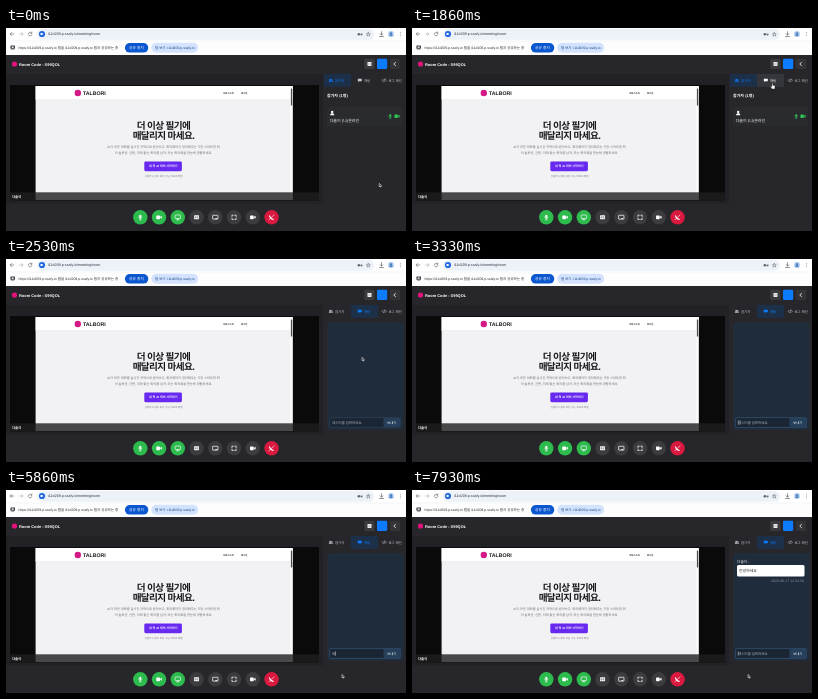
Animation of 400 by 203 pixels, one loop 8 s. Source, as an HTML page:

```html
<!DOCTYPE html>
<html lang="ko">
<head>
<meta charset="utf-8">
<title>Meeting room</title>
<style>
  html, body { margin: 0; width: 100%; height: 100%; overflow: hidden; background: #27272b; }
  svg { display: block; width: 100%; height: 100%; }
  text { font-family: "Liberation Sans", "Noto Sans CJK KR", "Noto Sans CJK", sans-serif; text-rendering: geometricPrecision; white-space: pre; }
</style>
</head>
<body>
<svg id="stage" viewBox="0 0 400 203" preserveAspectRatio="none"></svg>
<script>
const LOOP = 8000;
const HOST = 'i11d209.p.ssafy.io';
const USER = '다솔이';
const BLUE = '#0d7bfd', PANEL = '#27272b';

const rect = (x, y, w, h, fill, r = 0, extra = '') =>
  `<rect x="${x}" y="${y}" width="${w}" height="${h}" rx="${r}" fill="${fill}" ${extra}/>`;
const disc = (x, y, r, fill) => `<circle cx="${x}" cy="${y}" r="${r}" fill="${fill}"/>`;
const label = (x, y, size, fill, str, extra = '') =>
  `<text x="${x}" y="${y}" font-size="${size}" fill="${fill}" ${extra}>${str}</text>`;
const line = (d, color, w = 0.7) =>
  `<path d="${d}" fill="none" stroke="${color}" stroke-width="${w}" stroke-linecap="round" stroke-linejoin="round"/>`;
const solid = (d, fill) => `<path d="${d}" fill="${fill}"/>`;
const at = (x, y, body, scale = 1) => `<g transform="translate(${x} ${y}) scale(${scale})">${body}</g>`;
const group = (id, body) => `<g id="${id}">${body}</g>`;
const MID = 'text-anchor="middle"';
const BOLD = 'font-weight="700"';

// Icons are drawn around their own centre.
const icon = {
  mic: c => rect(-1, -2.9, 2, 3.7, c, 1) + line('M-1.8-.4A1.8 1.9 0 0 0 1.8-.4M0 1.5V2.7M-.9 2.7H.9', c, 0.6),
  camera: c => rect(-3, -2, 4, 4, c, 0.7) + solid('M1.3-.6 3-1.7V1.7L1.3.6Z', c),
  screen: c => rect(-2.9, -2.5, 5.8, 3.9, 'none', 0.5, `stroke="${c}" stroke-width=".7"`) + line('M0 1.5V2.6M-1.3 2.7H1.3', c),
  caption: c => rect(-2.7, -2.1, 5.4, 4.2, c, 0.5) + line('M-.6-.6H-1.6V.7H-.6M1.6-.6H.6V.7H1.6', '#3b3b40', 0.5),
  board: c => rect(-2.9, -2.2, 5.8, 4.2, 'none', 0.3, `stroke="${c}" stroke-width=".8"`) + rect(0, 0.9, 1.9, 0.9, c),
  expand: c => line('M-2.3-.9V-2.3H-.9M.9-2.3H2.3V-.9M2.3.9V2.3H.9M-.9 2.3H-2.3V.9', c, 0.85),
  hangup: c => line('M-2.2-1.6C-1.7.6-.4 1.9 1.8 2.3', c, 1.2) + line('M-2.7 2.7 2.7-2.7', c, 0.7),
  person: c => disc(0, -1.2, 1.2, c) + solid('M-2.1 2.1C-2.1-.5 2.1-.5 2.1 2.1Z', c),
  people: c => disc(-0.7, -0.9, 0.9, c) + disc(1, -0.8, 0.7, c) + solid('M-2.2 1.5C-2.2-.4.8-.4.8 1.5ZM1.1 1.5C1.1.7.9.4.7.1 1.7-.1 2.4.4 2.4 1.5Z', c),
  bubble: c => solid('M-2.2-1.7H2.2V1.1H-.4L-1.4 2V1.1H-2.2Z', c),
  code: c => line('M-1.2-1.2-2.4 0-1.2 1.2M1.2-1.2 2.4 0 1.2 1.2M.5-1.6-.5 1.6', c, 0.6),
  star: c => line('M0-2 .6-.6 2-.5.9.4 1.3 1.8 0 1-1.3 1.8-.9.4-2-.5-.6-.6Z', c, 0.5)
};

function browser() {
  const ink = '#5d6268';
  return rect(0, 0, 400, 13, '#fff') + rect(31, 0.8, 337, 11, '#edf1f8', 5.5) +
    line('M7.8 6H4.2M5.8 4.4 4.2 6 5.8 7.6', ink, 0.6) + line('M13.4 6H17M15.4 4.4 17 6 15.4 7.6', '#a9adb2', 0.6) +
    line('M25.6 5A1.8 1.8 0 1 0 25.9 6.6M25.9 4V5.2H24.7', ink, 0.6) +
    disc(36, 6, 3.1, '#2268df') + rect(34.5, 4.9, 2.2, 2.1, '#fff', 0.4) +
    label(42, 7.4, 3.67, '#30343a', HOST + '/meeting/room') +
    disc(352.8, 6.2, 1.2, ink) + line('M354 6.2H356.4M355.6 6.2V7.2', ink, 0.8) + at(362.3, 6.3, icon.star(ink)) +
    line('M375.5 3.7V7M374.2 5.8 375.5 7.1 376.8 5.8M373.6 8.5H377.4', ink) +
    disc(385, 6, 2.9, '#a9c8f2') + at(385, 6.1, icon.person('#3b6fae'), 0.8) +
    disc(394.3, 4.3, 0.45, ink) + disc(394.3, 6, 0.45, ink) + disc(394.3, 7.7, 0.45, ink) +
    rect(0, 13, 400, 14, '#fdfdfe') + rect(0, 12.8, 400, 0.4, '#dfe3e8') +
    rect(4.4, 17.6, 4.6, 3.2, '#3c4147', 0.4) + rect(5.7, 18.5, 2, 1.3, '#fff') + line('M5.6 21.4H7.8', '#3c4147', 0.5) +
    label(12.5, 20.9, 3.5, '#303338', `https://${HOST} 탭을 ${HOST} 탭과 공유하는 중`) +
    rect(118.9, 15, 23.4, 9.6, '#0b57d0', 4.8) + label(130.5, 21, 3.75, '#fff', '공유 중지', MID) +
    rect(145.3, 14.8, 46.8, 10, '#d3e3fd', 5) + label(168.8, 20.9, 3.45, '#17468a', `탭 보기: ${HOST}`, MID);
}

function header() {
  return rect(0, 27, 400, 19, PANEL) + disc(8.5, 36, 2.6, '#e5127d') +
    label(13, 37.5, 3.95, '#fff', 'Room Code : S99QOL', BOLD) +
    rect(358.3, 30.8, 10.2, 10.2, '#3a3a3f', 1.2) + rect(361.5, 34, 4, 4, '#f1f3f5', 0.4) +
    line('M362 35.3H365M362 36.7H365', '#747b82', 0.35) +
    rect(371, 30.8, 10.2, 10.2, BLUE, 1.2) +
    rect(383.8, 30.8, 10.2, 10.2, '#343438', 1.2) + line('M389.4 34.4 387.8 36 389.4 37.6', '#fff', 0.8);
}

function sharedPage() {
  const gray = '#666a70', left = 29.6, width = 257, mid = 157.5;
  return rect(left, 58, width, 114, '#f2f2f4') + rect(left, 58, width, 13.5, '#fff') + rect(left, 71.3, width, 0.4, '#e2e2e5') +
    disc(71.8, 65, 3.2, '#d41888') + label(77, 66.9, 5.2, '#17171c', 'TALBORI', BOLD) +
    label(217, 66, 2.3, '#222', '서비스소개', BOLD) + label(235, 66, 2.3, '#222', '로그인', BOLD) +
    label(mid, 101, 9.6, '#18181b', '더 이상 필기에', `${MID} ${BOLD} letter-spacing="-.6"`) +
    label(mid, 111.4, 9.6, '#18181b', '매달리지 마세요.', `${MID} ${BOLD} letter-spacing="-.6"`) +
    label(mid, 120.3, 3.2, gray, 'AI가 모든 대화를 실시간 자막으로 받아쓰고, 회의록까지 정리해주는 가장 스마트한 회', MID) +
    label(mid, 125.6, 3.2, gray, '의 솔루션, 간편, 미래 없는 회의를 남겨, 또는 회의록을 한눈에 경험하세요.', MID) +
    rect(138.3, 133.4, 37.6, 9.8, '#6728f0', 1.4) + label(157.2, 139.3, 3, '#fff', '내 첫 AI 회의 시작하기', `${MID} ${BOLD}`) +
    label(mid, 148.8, 2.5, '#777a80', '신용카드 없이 모든 기능 무료로 체험', MID) +
    rect(284.2, 58, 2.4, 114, '#fafafa') + rect(284.9, 60.5, 1.3, 17, '#4c4c50', 0.6);
}

function video() {
  return rect(0, 46, 317, 130, '#222125') + rect(4, 57, 309, 115.5, '#0a0a0b') + sharedPage() +
    rect(4, 164.3, 309, 8.2, '#1e1e20', 0, 'opacity=".8"') + label(6, 169.5, 3.4, '#fff', USER, BOLD);
}

function controls() {
  const green = '#2dbb4e', gray = '#3b3b40';
  const items = [
    ['mic', green], ['camera', green], ['screen', green], ['caption', gray],
    ['board', gray], ['expand', gray], ['camera', gray], ['hangup', '#d9193f']
  ];
  return rect(0, 175.5, 400, 27.5, PANEL) + items.map(([name, fill], i) =>
    at(134.3 + i * 18.75, 189.3, disc(0, 0, 7.2, fill) + at(0, 0, icon[name]('#fff'), 0.92))).join('');
}

const tabItems = [['people', '참가자', 318, 329], ['bubble', '채팅', 345, 358], ['code', '로그 확인', 372, 382.5]];

function tab(i, color, fill) {
  const [name, str, x, tx] = tabItems[i];
  return rect(x, 46, 27, 12.8, fill) +
    at(tx - 4.2, 52.3, icon[name](color), 0.9) + label(tx, 53.6, 3.4, color, str);
}

const tabs = active => tabItems.map((_, i) =>
  i === active ? tab(i, BLUE, '#1d304a') : tab(i, '#c3c8cd', PANEL)).join('');

function membersPanel() {
  return tabs(0) + group('hover', tab(1, '#fff', '#35363b')) +
    label(321, 69.2, 4, '#fff', '참가자 (1명)', BOLD) +
    rect(321, 79, 75.5, 19, '#2a2b2f', 1.5) + at(326.2, 85.2, icon.person('#fff')) +
    label(323.7, 93.5, 4, '#fff', `${USER} (나)온라인`) +
    at(384.2, 88.2, icon.mic('#2fc653'), 0.8) + at(391, 88.2, icon.camera('#2fc653'), 0.85);
}

function chatPanel() {
  const message = label(325, 73.2, 3.7, '#fff', `${USER} :`) +
    rect(325, 75, 67.5, 11.5, '#fff', 1.5) + label(327, 82.2, 3.9, '#1d2023', '안녕하세요') +
    label(392, 92, 3.55, '#8793a0', '2026-08-17 12:32:50', 'text-anchor="end"');
  return tabs(1) +
    rect(322, 64, 75, 106, '#1e2c3c', 1.5, 'stroke="#27394d" stroke-width=".4"') +
    group('message', message) +
    `<rect id="field" x="323.6" y="158.6" width="71" height="9.8" rx="1.2" fill="#1b2634" stroke-width=".45"/>` +
    rect(377.5, 159, 16.7, 9, '#26405b', 1.1) + label(385.7, 164.9, 3.3, '#fff', '보내기', MID) +
    `<text id="typed" x="326.3" y="165" font-size="3.4"></text>` +
    `<rect id="caret" y="161.4" width=".4" height="4.4" fill="#fff"/>`;
}

function pointers() {
  return group('arrow', at(0, 0, '<path d="M0 0V4.8L1.2 3.8 2 5.5 2.8 5.1 2.1 3.5 3.6 3.4Z" fill="#111" stroke="#fff" stroke-width=".8" stroke-linejoin="round"/>', 0.68)) +
    group('hand', '<path d="M-.6-1V2.2L-1.6 1.4-2.1 2-.5 4.5H2.2L2.6 1.6 1.8 1.1.4.9V-1Q-.1-1.6-.6-1Z" fill="#fff" stroke="#111" stroke-width=".35"/>') +
    group('beam', line('M-.5-1.8H.5M0-1.8V1.8M-.5 1.8H.5', '#9aa4ae', 0.3));
}

const stage = document.getElementById('stage');
stage.innerHTML = browser() + header() + video() + rect(317, 46, 83, 130, PANEL) + controls() +
  group('members', membersPanel()) + group('chat', chatPanel()) + pointers();
const el = {};
stage.querySelectorAll('[id]').forEach(node => { el[node.id] = node; });

const OPEN_CHAT = 2000, FOCUS = 3200, SEND = 7730;
const path = [
  [0, 373.2, 155.4], [60, 373.2, 155.4], [860, 360.5, 56.5], [2070, 360.5, 56.5], [2500, 356, 98.4],
  [2730, 356, 98.4], [3200, 328, 163.5], [3600, 328, 163.5], [3930, 336, 184.5], [LOOP, 336, 184.5]
];
const typing = [
  [FOCUS, ''], [4130, 'd'], [4400, 'dk'], [4700, 'dks'], [5060, 'dkss'], [5200, 'dk'], [5330, 'd'], [5460, ''],
  [5730, 'ㅇ'], [5860, '아'], [6060, '안'], [6260, '안ㄴ'], [6360, '안녀'], [6460, '안녕'], [6600, '안녕ㅎ'],
  [6860, '안녕하'], [7000, '안녕하ㅅ'], [7130, '안녕하세'], [7260, '안녕하세ㅇ'], [7400, '안녕하세요'], [SEND, '']
];

const show = (node, on) => node.setAttribute('visibility', on ? 'inherit' : 'hidden');
const ease = p => p * p * (3 - 2 * p);

function pointerAt(t) {
  const i = path.findIndex((p, k) => k > 0 && t <= p[0]);
  const [t0, x0, y0] = path[i - 1], [t1, x1, y1] = path[i];
  const p = ease((t - t0) / (t1 - t0));
  return [x0 + (x1 - x0) * p, y0 + (y1 - y0) * p];
}

function drawPointer(t) {
  const [x, y] = pointerAt(t);
  const onTab = y < 59;
  const kind = onTab ? 'hand' : t > OPEN_CHAT && y > 158 && y < 168.5 ? 'beam' : 'arrow';
  for (const name of ['arrow', 'hand', 'beam']) {
    show(el[name], name === kind);
    el[name].setAttribute('transform', `translate(${x} ${y})`);
  }
  show(el.hover, onTab);
}

function drawInput(t) {
  const focused = t >= FOCUS;
  const [since, str] = typing.filter(s => s[0] <= t).pop() || [0, ''];
  el.typed.textContent = str || '메시지를 입력하세요.';
  el.typed.setAttribute('fill', str ? '#fff' : '#b3bbc4');
  el.field.setAttribute('stroke', focused ? '#456f9c' : '#3a5069');
  el.caret.setAttribute('x', 326.2 + (str ? el.typed.getComputedTextLength() + 0.2 : -0.3));
  show(el.caret, focused && (t - since) % 1000 < 500);
}

function render(t) {
  const chatOpen = t >= OPEN_CHAT;
  el.members.setAttribute('display', chatOpen ? 'none' : 'inline');
  el.chat.setAttribute('display', chatOpen ? 'inline' : 'none');
  show(el.message, t >= SEND);
  if (chatOpen) drawInput(t);
  drawPointer(t);
}

const start = performance.now();
function tick(now) {
  render(Math.max(0, now - start) % LOOP);
  requestAnimationFrame(tick);
}
render(0);
requestAnimationFrame(tick);
</script>
</body>
</html>
```
